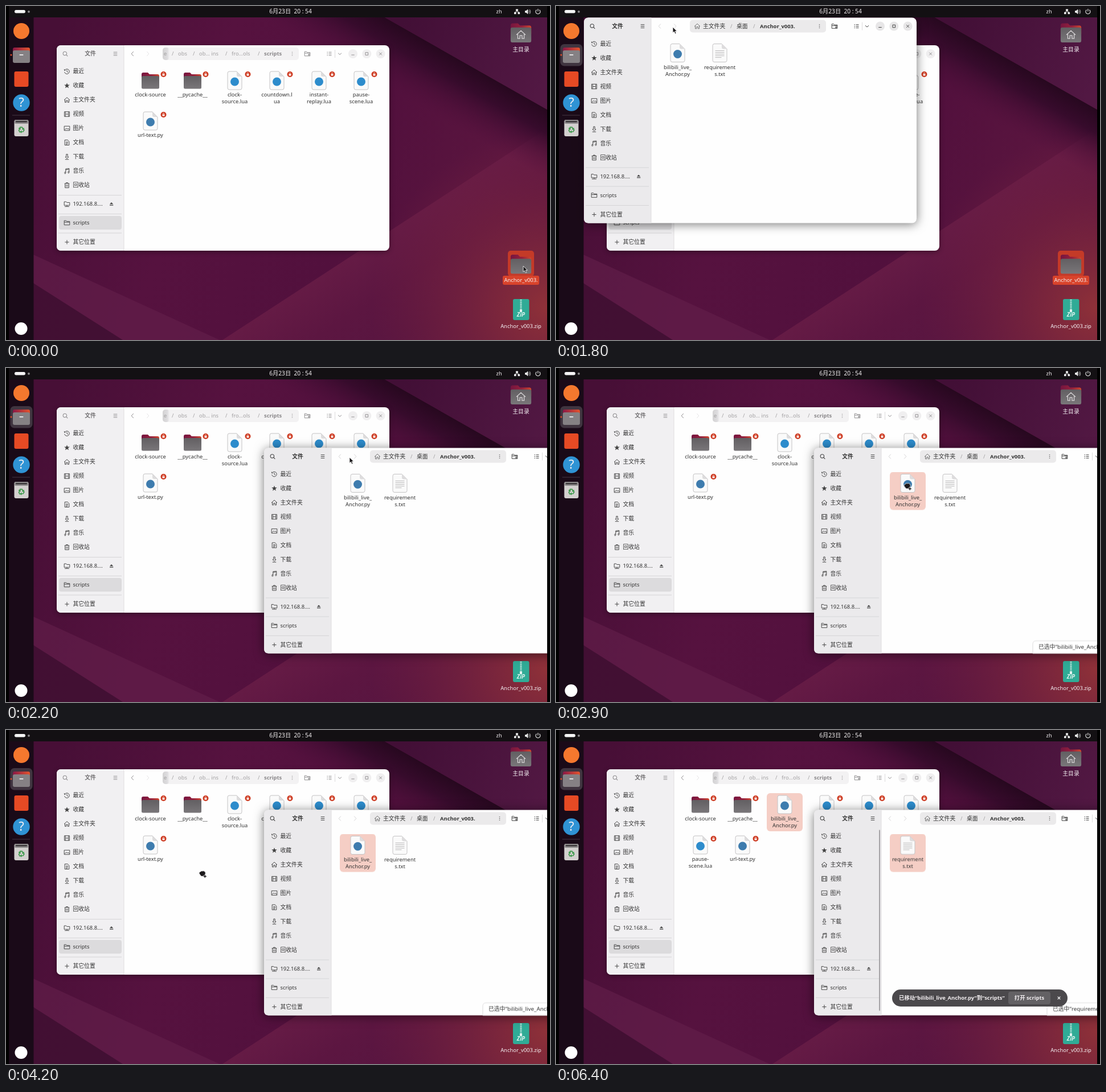
An HTML page for the animation above (6500 ms loop, 955 by 587 pixels).

```html
<!DOCTYPE html>
<html>
<head>
<meta charset="utf-8">
<title>Desktop</title>
<style>
html, body { margin: 0; width: 100%; height: 100%; overflow: hidden; background: #000; }
svg { display: block; width: 100vw; height: 100vh; }
text { font: 9.4px 'Noto Sans', 'Noto Sans CJK SC', 'Noto Sans CJK', sans-serif; fill: #333; white-space: pre; }
.cjk { font-size: 9.8px; }
.b { font-weight: 700; }
.mid { text-anchor: middle; }
.light { fill: #f4f0f2; }
.dim { fill: #a3a1a3; }
.shadow { filter: drop-shadow(0 2px 4px #0006); }
.raised { filter: drop-shadow(0 2px 9px #0008); }

.open, .drag, .before, .after, .picked, .toast, .hover, .scroll, .arrow, .hand, .cursor {
  animation: 6500ms linear infinite;
}
.open { animation-name: open; }
.drag { animation-name: drag; }
.cursor { animation-name: cursor; animation-timing-function: ease-in-out; }
.toast { animation-name: toast; }
.before, .after, .picked, .hover, .scroll, .arrow, .hand { animation-timing-function: step-end; }
.before { animation-name: before; }
.after { animation-name: after; }
.picked { animation-name: picked; }
.hover { animation-name: hover; }
.scroll { animation-name: scroll; }
.arrow { animation-name: arrow; }
.hand { animation-name: hand; }

@keyframes open { 0%, 9.23% { opacity: 0 } 11.54%, 100% { opacity: 1 } }
@keyframes drag {
  0%, 29.23% { transform: translate(49px, 20.5px); animation-timing-function: ease-in-out }
  33.8%, 100% { transform: translate(453px, 140.5px) }
}
@keyframes cursor {
  0%, 15.38% { transform: translate(908px, 457px) }
  27.6% { transform: translate(205px, 37px) }
  29.23% { transform: translate(199px, 37px) }
  33.8%, 35.38% { transform: translate(603px, 157px) }
  41.54%, 44.62% { transform: translate(617px, 205px) }
  53.85%, 66.15% { transform: translate(345px, 250px) }
  75.38%, 87.69% { transform: translate(496px, 180px) }
  93.85%, 100% { transform: translate(560px, -20px) }
}
@keyframes toast {
  0%, 66.15% { transform: translateY(50px); opacity: 0; animation-timing-function: ease-out }
  69.23%, 100% { transform: none; opacity: 1 }
}
@keyframes before { 0% { opacity: 1 } 65.38%, 100% { opacity: 0 } }
@keyframes after { 0% { opacity: 0 } 65.38%, 100% { opacity: 1 } }
@keyframes picked { 0% { opacity: 0 } 43.08% { opacity: 1 } 65.38%, 100% { opacity: 0 } }
@keyframes hover { 0% { opacity: 0 } 73.85% { opacity: 1 } 88.5%, 100% { opacity: 0 } }
@keyframes scroll { 0% { opacity: 0 } 72.31%, 100% { opacity: 1 } }
@keyframes arrow { 0% { opacity: 1 } 44.62% { opacity: 0 } 65.38%, 100% { opacity: 1 } }
@keyframes hand { 0% { opacity: 0 } 44.62% { opacity: 1 } 65.38%, 100% { opacity: 0 } }
</style>
</head>
<body>
<svg id="stage" viewBox="0 0 955 587" preserveAspectRatio="none"></svg>
<script>
const text = (x, y, s, cls = '', style = '') =>
  `<text x="${x}" y="${y + 3.4}" class="${cls}" style="${style}">${s}</text>`;
const rect = (x, y, w, h, fill, r = 0, more = '') =>
  `<rect x="${x}" y="${y}" width="${w}" height="${h}" rx="${r}" fill="${fill}" ${more}/>`;
const disc = (x, y, r, fill) => `<circle cx="${x}" cy="${y}" r="${r}" fill="${fill}"/>`;
const path = (d, fill, more = '') => `<path d="${d}" fill="${fill}" ${more}/>`;
const at = (x, y, s, more = '') => `<g transform="translate(${x} ${y})" ${more}>${s}</g>`;
const group = (cls, s) => `<g class="${cls}">${s}</g>`;
const gradient = (id, x1, y1, x2, y2, ...stops) =>
  `<linearGradient id="${id}" gradientUnits="userSpaceOnUse" x1="${x1}" y1="${y1}" x2="${x2}" y2="${y2}">` +
  stops.map(([o, c]) => `<stop offset="${o}" stop-color="${c}"/>`).join('') + '</linearGradient>';

// Line icons, centred on 0,0
const shapes = {
  clock: 'M-3.5-2.5A4.3 4.3 0 1 1-4.3 1M-4.5-4v2.2h2.2M0-2.5V.3L2 1.5',
  home: 'M-5 .3L0-4.3 5 .3M-3.5-.5V4.3h2.3V1h2.4v3.3h2.3V-.5',
  video: 'M-4.5-4.2h9v8.4h-9zM-2.6-4.2v8.4M2.6-4.2v8.4M-2.6 0H2.6',
  picture: 'M-4.8-3.8h9.6v7.6h-9.6zM-4 2.8L-1.2-.2 .5 1.5 2 0 4 2.6',
  doc: 'M-3.8-4.5h5l2.6 2.6v6.4h-7.6zM-2-1h4M-2 1h4M-2 3h3',
  download: 'M-1.2-4.5h2.4V.2H3L0 3.2-3 .2h1.8zM-3.2 4.7h6.4',
  music: 'M-2.2 3V-3.8L3.8-4.5V2M-2.2-2.2L3.8-3M-2.4 3.2a1 1 0 1 1-1.6 0 1 1 0 1 1 1.6 0M3.6 2.2a1 1 0 1 1-1.6 0 1 1 0 1 1 1.6 0',
  trash: 'M-4.3-3h8.6M-1.5-3v-1.5h3V-3M-3.3-3v7.4h6.6V-3M-1.2-1v3.7M1.2-1v3.7',
  folder: 'M-4.8 3.8v-7.6h3.4l1.2 1.5h5v6.1zM-4.8-1h9.6',
  net: 'M-4.8 2.3v-6.3h3.4l1.2 1.4h5v4.9zM0 2.3v2M-4 4.5h8',
  plus: 'M-3.6 0h7.2M0-3.6v7.2',
  search: 'M2 2L4.3 4.3M2.6-.6a3.2 3.2 0 1 1-6.4 0 3.2 3.2 0 1 1 6.4 0',
  menu: 'M-3.3-2.8h6.6M-3.3 0h6.6M-3.3 2.8h6.6',
  left: 'M1.8-4L-1.8 0 1.8 4',
  right: 'M-1.8-4L1.8 0-1.8 4',
  dots: 'M0-3.3v1M0-.5v1M0 2.3v1',
  list: 'M-4-2.8h1.5M-1-2.8h5M-4 0h1.5M-1 0h5M-4 2.8h1.5M-1 2.8h5',
  chevron: 'M-3-1.3L0 1.5 3-1.3',
  min: 'M-2.7 2h5.4',
  max: 'M-2.3-2.3h4.6v4.6h-4.6z',
  close: 'M-2.3-2.3L2.3 2.3M2.3-2.3L-2.3 2.3'
};
const icon = (name, x, y, color = '#4a4a4a', width = 1) =>
  at(x, y, path(shapes[name], 'none', `stroke="${color}" stroke-width="${width}"`));

const star = at(18, 71, path('M0-4.8L1.3-1.5 4.8-1.4 2 .8 3 4.2 0 2.2-3 4.2-2 .8-4.8-1.4-1.3-1.5z', '#444'));
const places = [['clock', '最近'], [null, '收藏'], ['home', '主文件夹'], ['video', '视频'], ['picture', '图片'],
  ['doc', '文档'], ['download', '下载'], ['music', '音乐'], ['trash', '回收站']];

const folder = path('M-15.5-11q0-3 3-3h8l3 3h14q3 0 3 3v10h-31z', 'url(#tab)') +
  rect(-15.5, -8, 31, 22.5, 'url(#grey)', 2.5);
const page = path('M-12.5-13q0-3 3-3h13l9 9v20q0 3-3 3h-19q-3 0-3-3z', '#fafafa', 'stroke="#c4c3c4"') +
  path('M3.5-16v6q0 3 3 3h6z', '#dddcdd');
const lines = path('M-8-4H8M-8-1H8M-8 2H8M-8 5H8M-8 8H3', 'none', 'stroke="#b9b8b9"');
const pictures = {
  folder,
  lua: page + disc(0, 2, 7.5, '#2d8ccc'),
  py: page + disc(0, 2, 7.5, '#3e7cae'),
  txt: page + lines
};
const lock = at(23, -11, disc(0, 0, 5, '#cd3a21') + rect(-2, -.6, 4, 3, '#fff', .4) +
  path('M-1.2-.5v-1a1.2 1.2 0 0 1 2.4 0v1', 'none', 'stroke="#fff" stroke-width=".8"'));
const selection = rect(-31.5, -20, 63, 67, '#f5cec5', 6);

const file = (col, row, kind, label, locked, selected) => at(164.5 + 74 * col, 62 + 71 * row,
  (selected ? selection : '') + pictures[kind] + (locked ? lock : '') +
  label.split('|').map((s, i) => text(0, 25 + 12 * i, s, 'mid')).join(''));

function frame(active, body) {
  const ink = active ? '#444' : '#929092', faint = active ? '#d6d5d6' : '#e6e5e6';
  const rule = y => rect(3, y, 111, 1, '#d6d5d7');
  return rect(0, 0, 584, 361, '#fefefe', 8, `class="${active ? 'raised' : 'shadow'}"`) +
    path('M118 0H8Q0 0 0 8V353Q0 361 8 361H118z', active ? '#ebeaec' : '#f1f0f2') +
    rect(117.5, 0, 1, 361, '#dfdee0') +
    (active ? group('hover', rect(4, 34, 110, 24, '#dad9db', 4)) : rect(4, 300, 110, 24, '#dcdbdd', 4)) +
    icon('search', 15, 15, ink, 1.1) + icon('menu', 103, 15, ink) +
    text(59, 15, '文件', 'mid b cjk', active ? '' : 'fill:#757375') +
    icon('left', 133, 15, active ? faint : ink) + icon('right', 160, 15, faint) +
    rect(186, 4, 239, 22, active ? '#ebeaeb' : '#f3f2f3', 5) + icon('dots', 413.5, 15, ink, 1.4) +
    icon('folder', 440, 15, ink) + disc(443, 17, 2, active ? '#777' : '#aaa') +
    icon('list', 478.5, 15, ink) + rect(488, 8, 1, 14, '#dddcdd') + icon('chevron', 497, 15, ink) +
    ['min', 'max', 'close'].map((n, i) =>
      disc(520 + 24.3 * i, 15, 8, active ? '#e7e6e7' : '#f0eff0') + icon(n, 520 + 24.3 * i, 15, ink)).join('') +
    places.map(([n, s], i) => (n ? icon(n, 18, 46 + 25 * i) : star) + text(28.5, 46 + 25 * i, s, 'cjk')).join('') +
    rule(263) + icon('net', 18, 279) + text(28.5, 279, '192.168.8.…') +
    path('M93 279.3L96 276l3.3 3.3zM93 280.5h6.3v1.3H93z', '#444') +
    rule(296) + icon('folder', 18, 312) + text(28.5, 312, 'scripts') +
    rule(329.5) + icon('plus', 18, 346) + text(28.5, 346, '其它位置', 'cjk') + body;
}

const crumbs = list => list.map(([x, s, cls]) => text(x, 15, s, cls)).join('');
const status = (x, s) =>
  path(`M584 339H${x + 6}q-6 0-6 6V361H584z`, '#fff', 'stroke="#dddcdd"') + text(x + 10, 350, s, 'cjk');

const backWindow = at(89, 69, frame(false,
  rect(186, 4, 12, 22, 'url(#fade)', 5) +
  crumbs([[188, 'e', 'dim'], [202, '/', 'dim'], [213, 'obs', 'dim'], [239, '/', 'dim'], [250, 'ob… ins', 'dim'],
    [296, '/', 'dim'], [307, 'fro…ols', 'dim'], [353, '/', 'dim']]) +
  text(364, 15, 'scripts', 'b', 'fill:#8a888a') +
  file(0, 0, 'folder', 'clock-source', 1) + file(1, 0, 'folder', '__pycache__', 1) +
  group('before',
    file(2, 0, 'lua', 'clock-|source.lua', 1) + file(3, 0, 'lua', 'countdown.l|ua', 1) +
    file(4, 0, 'lua', 'instant-|replay.lua', 1) + file(5, 0, 'lua', 'pause-|scene.lua', 1) +
    file(0, 1, 'py', 'url-text.py', 1)) +
  group('after',
    file(2, 0, 'py', 'bilibili_live_|Anchor.py', 0, 1) + file(3, 0, 'lua', 'clock-|source.lua', 1) +
    file(4, 0, 'lua', 'countdown.l|ua', 1) + file(5, 0, 'lua', 'instant-|replay.lua', 1) +
    file(0, 1, 'lua', 'pause-|scene.lua', 1) + file(1, 1, 'py', 'url-text.py', 1))));

const toast = group('toast', rect(137, 315.5, 308, 30, '#4b494c', 15) +
  text(149, 330.5, '已移动“bilibili_live_Anchor.py”到“scripts”', 'b light') +
  rect(341, 319.5, 74, 22, '#636164', 4) + text(378, 330.5, '打开 scripts', 'b light mid') +
  icon('close', 430, 330.5, '#fff', 1.2));

const frontWindow = group('open', group('drag', frame(true,
  icon('home', 199, 15, '#777') +
  crumbs([[209, '主文件夹', 'cjk'], [257, '/', 'dim'], [268, '桌面', 'cjk'], [297, '/', 'dim'], [309, 'Anchor_v003.', 'b']]) +
  group('picked', at(164.5, 62, selection) + status(384, '已选中“bilibili_live_Anchor.py”')) +
  group('before', file(0, 0, 'py', 'bilibili_live_|Anchor.py') + file(1, 0, 'txt', 'requirement|s.txt')) +
  group('after', file(0, 0, 'txt', 'requirement|s.txt', 0, 1) + status(409, '已选中“requirements.txt”')) +
  group('scroll', rect(114, 35, 2, 318, '#a5a3a6', 1)) + toast)));

const wallpaper = rect(5, 0, 945, 587, 'url(#wall)') +
  path('M380 587L950 215V587z', 'url(#glow)') +
  path('M380 20H665L950 182V400z', 'url(#fold)') +
  path('M665 20H950V182z', 'url(#sheen)') +
  path('M48 437L375 587H48z', '#64204c', 'opacity=".6"') +
  path('M48 487L205 587H48z', '#3a0c2e', 'opacity=".75"') +
  rect(5, 0, 945, 587, 'url(#ember)');

const desktop =
  at(904, 47, `<g transform="scale(1.17)">${folder}</g>` + at(0, 2, icon('home', 0, 0, '#d8d5d7', .8), 'style="scale:1.6"')) +
  text(904, 77, '主目录', 'mid light cjk') +
  rect(881, 430, 46, 45, '#c43a28', 5) + at(904, 453.5, `<g transform="scale(1.17)">${folder}</g>`) +
  rect(872, 474, 64, 16, '#d9432b', 3) + text(904, 482, 'Anchor_v003.', 'mid light') +
  rect(890, 515, 28.5, 37, '#30ab96', 3) +
  path('M904 516v19', 'none', 'stroke="#e4f4f0" stroke-width="3" stroke-dasharray="1.2 1.2"') +
  rect(902, 533, 4, 5, '#e4f4f0', 1) +
  text(904, 543, 'ZiP', 'mid b', 'fill:#d8f2ec;font-style:italic;font-size:10px') +
  text(904, 563, 'Anchor_v003.zip', 'mid light');

const dock = rect(5, 20, 43.5, 567, '#170a16', 0, 'opacity=".93"') +
  group('open', rect(7.5, 67, 39, 38.5, '#403540', 7)) +
  disc(27, 44, 14, '#f4782e') + disc(9, 86, 1.5, '#e2502c') +
  rect(12, 73, 30, 22, 'url(#dockTab)', 3) + rect(12, 78, 30, 22, '#858184', 3) + rect(23.5, 85, 7, 1.7, '#f1eff0', .8) +
  rect(14.5, 115, 25, 27, '#e64a24', 3) +
  disc(27, 170, 14.7, '#2f93d4') + text(27, 173.5, '?', 'mid light', 'font-size:22px') +
  rect(11, 191.5, 31, 1, '#443642') +
  rect(14.5, 200, 25, 29, '#d3d0cf', 3) + rect(14.5, 200, 25, 7, '#8f8b8d', 3) + rect(17, 202, 20, 2.5, '#3c383b', 1) +
  at(27, 217.5, [0, 120, 240].map(a => path('M-3-4.4H1.2L3.6-.8M4.5-3L3.7-.6 1.3-1.2', 'none',
    `stroke="#3e9a4c" stroke-width="1.7" transform="rotate(${a})"`)).join('')) +
  disc(26.5, 567, 11, '#fff');

const topBar = rect(5, 0, 945, 20, '#131013') + rect(15, 7, 19, 5.5, '#f5f5f5', 2.7) + disc(40, 10, 1.9, '#8b898b') +
  text(499.5, 10, '6月23日  20 : 54', 'mid light', 'font-size:10.2px') + text(860.5, 9.5, 'zh', 'light') +
  path('M895 5.5h4v3.2h-4zM892 11h3.6v3.2H892zM898.5 11h3.6v3.2h-3.6zM896.6 8.5h.9v1.3h3.2v1.5h-.9v-.7h-5.5v.7h-.9V9.8h3.2z', '#eee') +
  path('M911 8.3h2.2L916.3 5.5v9l-3.1-2.8H911z', '#eee') +
  path('M917.7 7.6q2 2.4 0 4.8M919 6q3.4 4 0 8', 'none', 'stroke="#bbb"') +
  path('M931.5 6.8a4 4 0 1 0 4.8 0M933.9 5v4.5', 'none', 'stroke="#eee" stroke-width="1.1"');

const cursor = group('cursor',
  group('arrow', path('M0 0V10.2L2.4 8 4.2 12 6 11.2 4.3 7.3H7.4z', '#1b191b', 'stroke="#fff" stroke-width=".8"')) +
  group('hand', path('M-6 2Q-6-1-3.5-1-2-3 0-2 2-3 3.2-1.4 5.5-1 5.2 2L4 7H-2.5z', '#1b191b', 'stroke="#fff" stroke-width=".7"') +
    path('M1.5 7.3h5.5M4.3 4.6v5.4', 'none', 'stroke="#fff" stroke-width="3"') +
    path('M1.8 7.3h5M4.3 4.8v5', 'none', 'stroke="#1b191b" stroke-width="1.4"')));

const defs = '<defs>' +
  gradient('wall', 50, 150, 850, 420, [0, '#470f36'], [.35, '#56123f'], [.7, '#52103d'], [1, '#5c163f']) +
  gradient('glow', 660, 404, 755, 550, [0, '#651b45'], [.5, '#5c1641'], [1, '#581540']) +
  gradient('fold', 808, 101, 755, 194, [0, '#27081f'], [.35, '#370b2c'], [1, '#4f0f3b00']) +
  gradient('sheen', 700, 20, 950, 120, [0, '#420f36'], [1, '#521843']) +
  gradient('fade', 186, 0, 198, 0, [0, '#d3d2d3'], [.7, '#dedddf'], [1, '#f3f2f3']) +
  gradient('tab', -16, 0, 16, 0, [0, '#741540'], [.55, '#96203c'], [1, '#d2482c']) +
  gradient('dockTab', 12, 0, 42, 0, [0, '#8a1846'], [1, '#e2552e']) +
  gradient('grey', 0, -8, 0, 15, [0, '#625f62'], [1, '#7a777a']) +
  '<radialGradient id="ember" gradientUnits="userSpaceOnUse" cx="950" cy="530" r="310">' +
  '<stop offset="0" stop-color="#9c3836" stop-opacity=".8"/><stop offset="1" stop-color="#802440" stop-opacity="0"/>' +
  '</radialGradient></defs>';

const sides = rect(0, 0, 5, 587, '#000') + rect(950, 0, 5, 587, '#000');
document.getElementById('stage').innerHTML =
  defs + wallpaper + desktop + backWindow + frontWindow + dock + topBar + sides + cursor;
</script>
</body>
</html>
```
